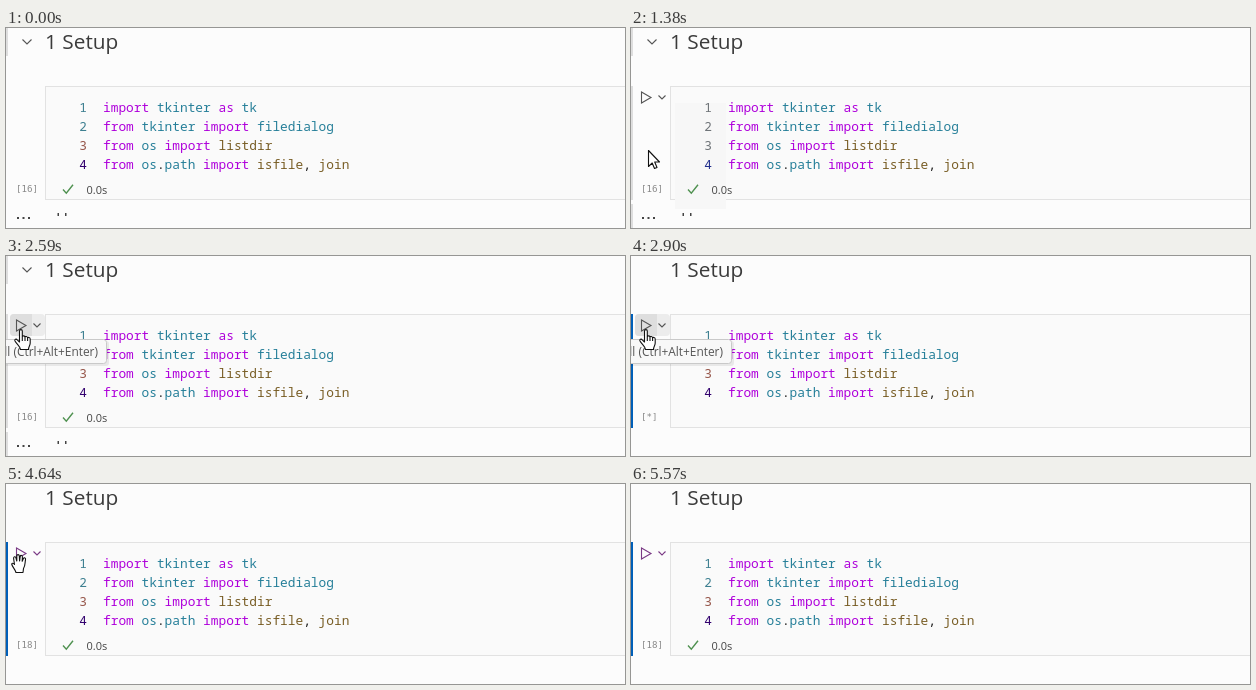
Animation of 619x200 px, one loop 6.32 s. Source, as an HTML page:

```html
<!DOCTYPE html>
<html lang="en">
<head>
<meta charset="utf-8">
<title>Running a notebook cell</title>
<style>
  html, body { margin: 0; width: 100%; height: 100%; overflow: hidden; background: #fcfcfc; }
  svg { display: block; width: 619px; height: 200px; }
  text { font-family: "Open Sans", "Noto Sans", sans-serif; white-space: pre; }
  .code, .code text { font: 12.83px "Noto Sans Mono", "DejaVu Sans Mono", monospace; }
  .label { font: 9.17px "DejaVu Sans Mono", monospace; fill: #888; }
  .line { fill: none; stroke: #555; stroke-width: 1.1; }
  .pointer { fill: #fff; stroke: #111; stroke-width: 1.1; stroke-linejoin: round; }
  .k { fill: #af00db; }
  .m { fill: #267f99; }
  .f { fill: #795e26; }
</style>
</head>
<body>
<svg viewBox="0 0 619 200">
  <rect width="619" height="200" fill="#fcfcfc"/>

  <!-- Heading cell -->
  <rect width="2" height="28" fill="#dedede" data-on="0 2740"/>
  <path class="line" d="M16.5 11.5l4.5 4.5 4.5-4.5" data-on="0 2900"/>
  <text x="39" y="21" font-size="20.8" fill="#3b3b3b">1 Setup</text>

  <!-- Code cell -->
  <rect x="39.5" y="58.5" width="590" height="113" fill="#fafafa" stroke="#e2e2e2"/>
  <g fill="#dedede" data-on="270 2900">
    <rect y="58" width="2" height="114"/>
    <rect y="176" width="2" height="24"/>
  </g>
  <rect y="58" width="2" height="114" fill="#005fb8" data-on="2900 6320"/>
  <rect x="44" y="75" width="51" height="106" fill="#f7f7f7" data-on="800 1520"/>

  <g class="code" id="numbers" text-anchor="end"></g>
  <g class="code" fill="#222">
    <text x="97" y="84"><tspan class="k">import</tspan> <tspan class="m">tkinter</tspan> <tspan class="k">as</tspan> <tspan class="m">tk</tspan></text>
    <text x="97" y="103"><tspan class="k">from</tspan> <tspan class="m">tkinter</tspan> <tspan class="k">import</tspan> <tspan class="m">filedialog</tspan></text>
    <text x="97" y="122"><tspan class="k">from</tspan> <tspan class="m">os</tspan> <tspan class="k">import</tspan> <tspan class="f">listdir</tspan></text>
    <text x="97" y="141"><tspan class="k">from</tspan> <tspan class="m">os</tspan>.<tspan class="m">path</tspan> <tspan class="k">import</tspan> <tspan class="f">isfile</tspan>, <tspan class="f">join</tspan></text>
  </g>
  <path class="line" d="M86 78l3.5 3.5 3.5-3.5" id="fold"/>
  <circle cx="48.5" cy="137" r="4" fill="#f19a9a" data-on="800 1100"/>

  <!-- Status and output -->
  <text class="label" x="10" y="164" id="count"></text>
  <g data-on="0 2900, 3170 6320">
    <path d="M57 161.5l3.3 3.7 6.7-8.4" fill="none" stroke="#4f9150" stroke-width="1.4"/>
    <text x="80.5" y="165.5" font-size="11" fill="#444">0.0s</text>
  </g>
  <g fill="#444" data-on="0 2900">
    <path d="M11 189h2v2h-2zM16.500 189h2v2h-2zM22 189h2v2h-2z"/>
    <path d="M51.500 185h1.500v3h-1.500zM59 185h1.500v3h-1.500z"/>
  </g>

  <!-- Run button -->
  <g data-on="270 6320">
    <g data-on="2070 4640">
      <rect x="4" y="58" width="35" height="22" rx="4" fill="#ececec"/>
      <path d="M8 58h18v22h-18a4 4 0 0 1-4-4v-14a4 4 0 0 1 4-4z" fill="#dedede"/>
    </g>
    <path class="line run" d="M10.500 64l9.500 5.500-9.500 5.500z"/>
    <path class="line run" d="M27.500 67.500l3.500 3.500 3.500-3.500"/>
  </g>
  <g data-on="2590 4640">
    <rect x="-98" y="85" width="201" height="25" rx="3" fill="#000" opacity=".07"/>
    <rect x="-100.500" y="83.500" width="201" height="24" rx="3" fill="#f8f8f8" stroke="#c9c9c9"/>
    <text x="92" y="100" font-size="11.9" text-anchor="end" fill="#555">Execute Cell (Ctrl+Alt+Enter)</text>
  </g>

  <g id="cursor">
    <path class="pointer" id="arrow" d="M.5 .5V16.500L4.200 13 6.500 18.500 9 17.500 6.700 12H11.500z"/>
    <path class="pointer" id="grab" d="M5 18.500C4 15 1.500 13 .8 10.500 .5 9 2.500 8.700 3.500 10.500L2.600 4.500C2.400 2.500 4.600 2.200 5 4L5.800 7V2C5.800 .2 8.200 .2 8.300 2L8.600 7 9.200 2.400C9.600 .8 11.600 1.200 11.400 3L11.200 7.300 12.400 4.600C13.200 3 15 4 14.500 5.800 13.800 9 14.300 12 12.500 14.500L12 18.500z"/>
    <path class="pointer" id="hand" d="M5.500 13V2C5.500 .1 8.300 .1 8.300 2V8C8.300 6.500 11 6.500 11 8.300 11.200 7 13.600 7.200 13.600 9 14 8 16.200 8.200 16.200 10V14C16.200 16.500 14.500 17.500 14.500 20.500H6.500C6.500 17.500 3 15.500 1 12 .2 10.300 2.200 9.500 3.300 10.800zM8.300 8v4M11 8.500v3.500M13.600 9v3"/>
  </g>
</svg>
<script>
  const LOOP = 6320;
  const $ = id => document.getElementById(id);

  const steps = [
    [0, ''], [270, 'arrow', 91, 180], [410, 'arrow', 83, 174], [530, 'arrow', 72, 168],
    [660, 'arrow', 61, 162], [800, 'arrow', 46, 148], [950, 'arrow', 41, 147],
    [1100, 'arrow', 27, 133], [1250, 'arrow', 21, 128], [1380, 'arrow', 17, 122],
    [1520, 'arrow', 9, 85], [1660, 'grab', 6, 77], [1790, 'grab', 6, 73],
    [1940, 'grab', 5, 70.5], [2070, 'hand', 7, 76], [2210, 'hand', 8, 73],
    [4640, 'grab', 5, 70], [4780, 'arrow', 28, 77], [4900, 'arrow', 100, 100],
    [5030, 'arrow', 211, 130], [5150, 'arrow', 329, 154], [5300, 'arrow', 437, 174],
    [5420, 'arrow', 538, 191], [5570, '']
  ];

  const timed = [...document.querySelectorAll('[data-on]')].map(el => ({
    el, spans: el.dataset.on.split(',').map(s => s.trim().split(' ').map(Number))
  }));
  const show = (el, on) => el.style.display = on ? '' : 'none';

  const numberColors = ['#3d7f90', '#3d7f90', '#96564a', '#32006e'];
  const hoverColors = ['#6f7478', '#6f7478', '#6f7478', '#222f8c'];
  const numbers = numberColors.map((color, i) => {
    const text = document.createElementNS('http://www.w3.org/2000/svg', 'text');
    text.setAttribute('x', 81);
    text.setAttribute('y', 84 + 19 * i);
    text.textContent = i + 1;
    return $('numbers').appendChild(text);
  });

  function draw(t) {
    for (const { el, spans } of timed) show(el, spans.some(([a, b]) => t >= a && t < b));

    const overGutter = t >= 800 && t < 1520;
    numbers.forEach((n, i) => n.style.fill = (overGutter ? hoverColors : numberColors)[i]);
    $('fold').style.opacity = t < 800 || t >= 1380 ? 0 : t < 950 ? .3 : t < 1250 ? .6 : .3;
    $('count').textContent = t < 2900 ? '[16]' : t < 3170 ? '[*]' : '[18]';
    for (const icon of document.querySelectorAll('.run')) {
      icon.style.stroke = t < 3050 ? '#555' : '#7a3a85';
    }

    const [, shape, x = 0, y = 0] = steps.findLast(s => s[0] <= t);
    for (const id of ['arrow', 'grab', 'hand']) show($(id), id === shape);
    $('cursor').setAttribute('transform', `translate(${x} ${y})`);
  }

  const start = performance.now();
  function tick() {
    draw((performance.now() - start) % LOOP);
    requestAnimationFrame(tick);
  }
  tick();
</script>
</body>
</html>
```
